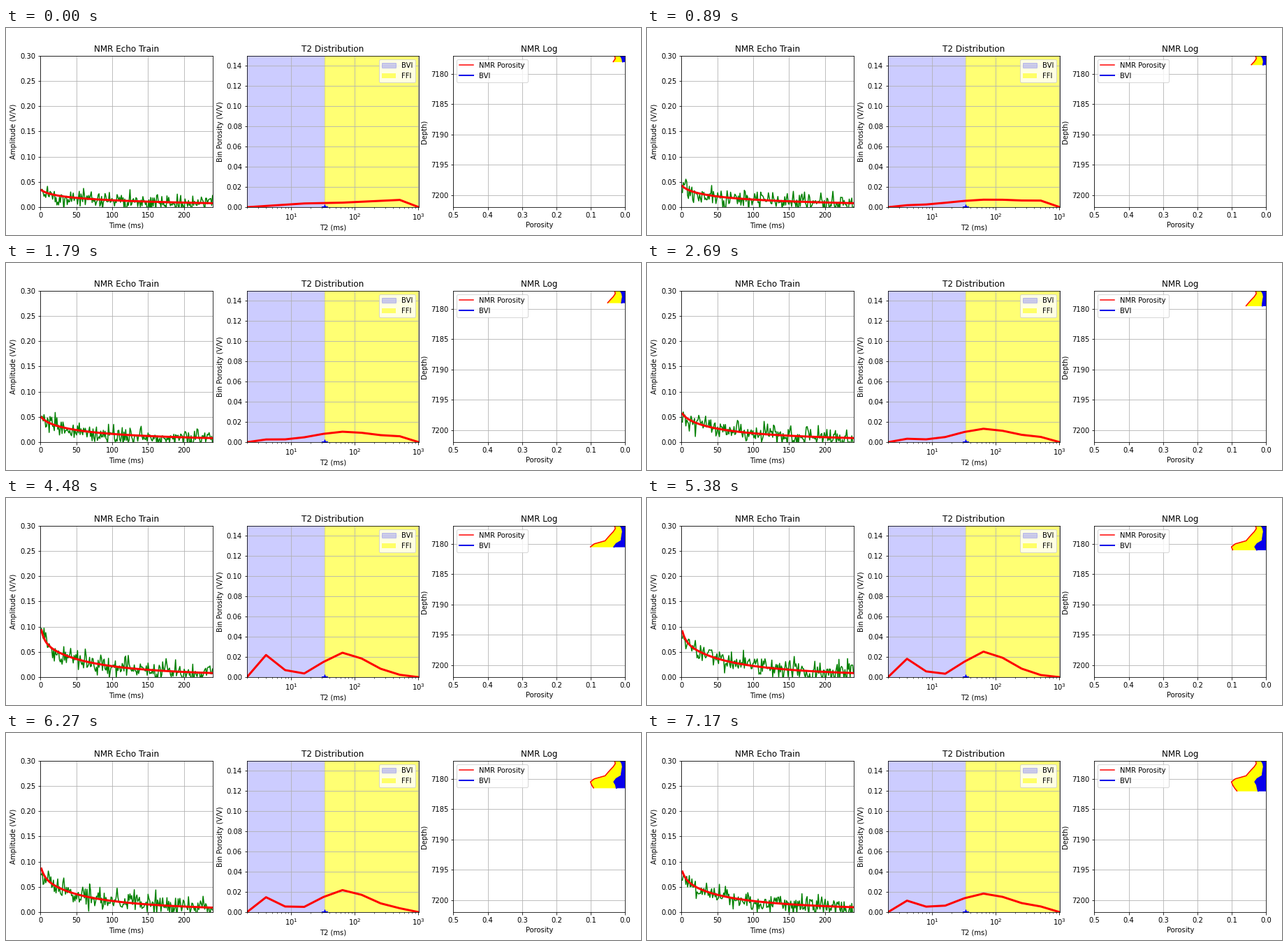
Recreate the animation shown at these times as a matplotlib script. Size 909 by 297 pixels, loop 8000 ms.

```python
import numpy as np
import matplotlib.pyplot as plt
from matplotlib.animation import FuncAnimation

W, H, DPI = 909, 297, 72
AX_W, AX_H, GAP = 246.18, 217.44, 295.41
LEFT, BOTTOM = 49.47, 39.9

LOOP, DT = 8000, 40
STEP_MS, STEPS = 896, 9

CUTOFF = 33
BLUE = "#0800eb"
OCTAVE = np.arange(1, 11)
T2 = 2.0 ** OCTAVE
TIME = 1.2 * np.arange(1, 201)

# Strength of the three spectral components at a few depth steps
KEYS = [0, 3, 4, 5, 6, 8]
SLOW = [1, 0.6, 0.08, 0.05, 0, 0.6]
FAST = [0, 0.0026, 0.0168, 0.0219, 0.0182, 0.0106]
MAIN = [0, 0.0106, 0.022, 0.024, 0.0253, 0.0157]


def spectrum_at(step):
    """Slow ramp + fast peak at 4 ms + skewed main bump at 64 ms."""
    slow, fast, main = (np.interp(step, KEYS, v) for v in (SLOW, FAST, MAIN))
    ramp = np.interp(OCTAVE, [1, 4, 6, 9, 10], [0, 0.0037, 0.0045, 0.0072, 0])
    peak = np.interp(OCTAVE, [1, 2, 3, 4], [0, 1, 0.3, 0])
    width = np.where(OCTAVE < 6, 1 + 0.4 * slow, 1.35)
    bump = np.exp(-((OCTAVE - 6) / width) ** 2 / 2)
    bump[[0, -1]] = 0
    return slow * ramp + fast * peak + main * bump


SPECTRA = np.array([spectrum_at(k) for k in range(STEPS)])

# The log already holds two depths when the loop begins
POROSITY = np.r_[0.031, 0.029, SPECTRA.sum(axis=1)]
BVI = np.r_[0.014, 0.009, SPECTRA[:, T2 < 32].sum(axis=1)]
DEPTH = 7177 + 0.5 * np.arange(STEPS + 2)

FIT = SPECTRA @ np.exp(-TIME / T2[:, None])
NOISE = np.random.default_rng(7).normal(0, 0.01, FIT.shape)

plt.rcParams.update({"font.family": "DejaVu Sans", "font.size": 10})
fig = plt.figure(figsize=(W / DPI, H / DPI), dpi=DPI, facecolor="white")


def panel(col, title, xlabel, ylabel):
    ax = fig.add_axes([(LEFT + col * GAP) / W, BOTTOM / H, AX_W / W, AX_H / H])
    ax.set_title(title)
    ax.set_xlabel(xlabel)
    ax.set_ylabel(ylabel)
    ax.grid(True)
    return ax


# Echo train
ax = panel(0, "NMR Echo Train", "Time (ms)", "Amplitude (V/V)")
ax.set(xlim=(0, 240), ylim=(0, 0.3), xticks=range(0, 201, 50),
       yticks=np.arange(7) * 0.05)
echo, = ax.plot([], [], "g", lw=1.5)
decay, = ax.plot([], [], "r", lw=3)

# T2 distribution
ax = panel(1, "T2 Distribution", "T2 (ms)", "Bin Porosity (V/V)")
ax.set_xscale("log")
ax.axvspan(T2[0], CUTOFF, color="blue", alpha=0.2, label="BVI")
ax.axvspan(CUTOFF, T2[-1], color="yellow", alpha=0.55, lw=0, label="FFI")
ax.set(xlim=(T2[0], T2[-1]), ylim=(0, 0.15), yticks=np.arange(8) * 0.02)
spectrum, = ax.plot([], [], "r", lw=3)
ax.plot(CUTOFF, 0, "b*", ms=8)
ax.legend(loc="upper right")

# Depth log
ax = panel(2, "NMR Log", "Porosity", "Depth)")
ax.set(xlim=(0.5, 0), ylim=(7202, 7177), xticks=np.arange(6) * 0.1,
       yticks=range(7180, 7201, 5))
free, = ax.fill([0, 0, 0], [7177] * 3, color="yellow", lw=1, zorder=1.8)
bound, = ax.fill([0, 0, 0], [7177] * 3, color=BLUE, lw=1, zorder=1.8)
por_line, = ax.plot([], [], "r", lw=1.5, label="NMR Porosity")
bvi_line, = ax.plot([], [], color=BLUE, lw=2, label="BVI")
ax.legend(loc="upper left")


def band(x1, x2, y):
    return np.c_[np.r_[x1, x2[::-1]], np.r_[y, y[::-1]]]


def draw(frame):
    k = ((frame + 1) * DT - 1) // STEP_MS
    echo.set_data(TIME, FIT[k] + NOISE[k])
    decay.set_data(TIME, FIT[k])
    spectrum.set_data(T2, SPECTRA[k])

    n = k + 3
    por, bvi, depth = POROSITY[:n], BVI[:n], DEPTH[:n]
    por_line.set_data(por, depth)
    bvi_line.set_data(bvi, depth)
    free.set_xy(band(por, bvi, depth))
    bound.set_xy(band(bvi, np.zeros(n), depth))
    return echo, decay, spectrum, por_line, bvi_line, free, bound


anim = FuncAnimation(fig, draw, frames=LOOP // DT, interval=DT, repeat=True)
plt.show()
```
